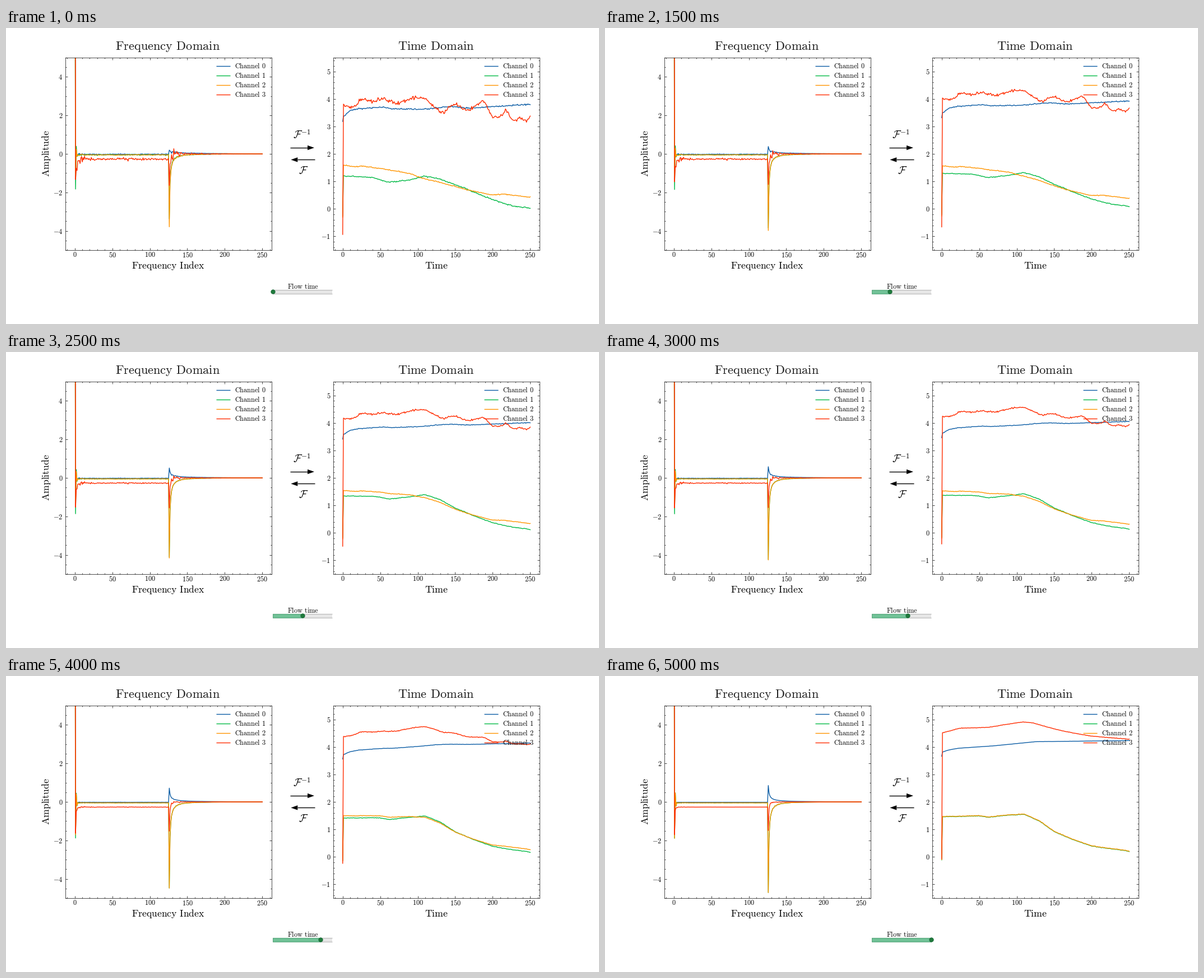
Recreate the animation shown at these times as a matplotlib script. Size 1058x529 px, loop 5.25 s.

```python
import matplotlib.pyplot as plt
import numpy as np
from matplotlib.animation import FuncAnimation
from matplotlib.patches import Polygon, Rectangle
from matplotlib.ticker import AutoMinorLocator

W, H, DPI = 1058, 529, 100
FRAMES, STEP_MS = 21, 250
N = np.arange(251)
COLORS = ["#0C5DA5", "#00B945", "#FF9500", "#FF2C00"]
EASE = [1.05, 0.85, 1.3, 0.95]  # how fast each channel flows
rng = np.random.default_rng(7)

plt.rcParams.update({
    "mathtext.fontset": "cm", "font.size": 8.8, "axes.linewidth": 0.5,
    "xtick.direction": "in", "ytick.direction": "in",
    "xtick.top": True, "ytick.right": True,
})


def series(first, noise, *keys):
    """Rounded path through the keys with jitter; sample 0 stands apart."""
    x, y = zip(*keys)
    path = np.pad(np.interp(N, x, y), 2, mode="edge")
    path = np.convolve(path, np.ones(5) / 5, mode="valid")
    path += rng.normal(0, noise, N.size)
    path[0] = first
    return path


def spectrum(dc, level, spike, ring, peak, power, noise=0.0, burst=0.0):
    """Real half: ringing spike on a level. Imaginary half: power-law decay."""
    n, m = N[1:126], N[126:] - 125
    real = level + (spike - level) * ring ** (n - 1.0)
    real += rng.normal(0, 1, n.size) * (noise + burst * np.exp(-n / 6)) * (n > 2)
    imag = peak * m ** -power * (1 - m / 125)
    imag += (rng.normal(0, 1, m.size) * (m > 2)
             * (noise * np.exp(-m / 40) + burst * np.exp(-m / 9)))
    return np.concatenate([[dc], real, imag])


fall = series(-0.1, 0.006, (0, 1.47), (50, 1.5), (62, 1.45), (85, 1.52),
              (110, 1.56), (130, 1.32), (150, 0.93), (175, 0.64), (200, 0.4),
              (250, 0.22))
time_start = [
    series(3.18, 0.013, (0, 3.33), (10, 3.58), (20, 3.64), (55, 3.70),
           (66, 3.64), (106, 3.62), (145, 3.73), (165, 3.66), (250, 3.81)),
    series(-0.25, 0.011, (0, 1.2), (40, 1.15), (60, 0.97), (90, 1.05),
           (108, 1.2), (130, 1.08), (160, 0.78), (200, 0.33), (225, 0.12),
           (250, 0.02)),
    series(-0.3, 0.009, (0, 1.6), (15, 1.53), (27, 1.56), (55, 1.45), (90, 1.29),
           (105, 1.12), (130, 0.96), (165, 0.7), (200, 0.5), (215, 0.54),
           (250, 0.42)),
    series(-0.93, 0.035, (0, 3.75), (15, 3.72), (24, 4.0), (40, 3.9), (55, 4.03),
           (70, 3.83), (90, 4.0), (108, 4.06), (120, 3.75), (135, 3.48),
           (148, 3.83), (167, 3.58), (187, 3.95), (200, 3.34), (211, 3.34),
           (217, 3.65), (228, 3.13), (236, 3.35), (242, 3.17), (250, 3.35)),
]
time_end = [
    series(3.66, 0.001, (0, 3.8), (8, 3.88), (22, 3.95), (70, 4.04), (125, 4.19),
           (250, 4.23)),
    fall - 0.01,
    fall,
    series(-0.07, 0.004, (0, 4.5), (24, 4.68), (62, 4.71), (98, 4.87),
           (110, 4.91), (122, 4.87), (145, 4.69), (165, 4.56), (200, 4.39),
           (250, 4.28)),
]
freq_start = [
    spectrum(58, -0.02, -0.2, 0.3, 0.2, 0.4, 0.012, 0.04),
    spectrum(13, -0.05, -1.83, -0.25, -3.4, 1.2, 0.015, 0.05),
    spectrum(16, -0.05, -1.2, -0.25, -3.82, 1.25, 0.01, 0.04),
    spectrum(58, -0.27, -1.33, 0.45, -1.65, 1.6, 0.035, 0.22),
]
shared = spectrum(16, -0.05, -1.89, -0.28, -4.75, 1.3, 0.002, 0.03)
freq_end = [
    spectrum(62, -0.02, -0.3, 0.3, 0.86, 0.85),
    shared,
    shared,
    spectrum(66, -0.27, -1.7, 0.12, -1.5, 2.0, 0.001, 0.04),
]

fig = plt.figure(figsize=(W / DPI, H / DPI), dpi=DPI, facecolor="white")


def panel(left, ylim, yticks):
    ax = fig.add_axes([left / W, 1 - 397 / H, 368 / W, 344 / H])
    ax.set(xlim=(-12.5, 262.5), ylim=ylim)
    xticks = range(0, 251, 50)
    ax.set_xticks(xticks, [f"${v}$" for v in xticks])
    ax.set_yticks(yticks, [f"${v}$" for v in yticks])
    ax.xaxis.set_minor_locator(AutoMinorLocator())
    ax.yaxis.set_minor_locator(AutoMinorLocator())
    ax.tick_params(which="major", length=3, width=0.5)
    ax.tick_params(which="minor", length=1.5, width=0.5)
    ax.tick_params(axis="x", pad=1.7)
    return [ax.plot(N, N * 0, color=c, lw=1)[0] for c in COLORS]


freq_lines = panel(106, (-5, 5), range(-4, 5, 2))
time_lines = panel(584, (-1.5, 5.5), range(-1, 6))

# Pixel-space layer for lettering, arrows and the slider
top = fig.add_axes([0, 0, 1, 1], zorder=5)
top.set(xlim=(0, W), ylim=(H, 0))
top.axis("off")


def label(x, y, words, size=8.8, ha="center", **kw):
    words = words.replace(" ", r"\hspace{0.38}")
    return top.text(x, y, rf"$\mathrm{{{words}}}$", size=size, ha=ha,
                    va="baseline", **kw)


def legend(x):
    for i, color in enumerate(COLORS):
        y = 68 + 17 * i
        top.plot([x, x + 25], [y, y], color=color, lw=1, solid_capstyle="butt")
        label(x + 33, y + 3.6, f"Channel {i}", ha="left")


def arrow(tail_x, tip_x, y):
    base = tip_x - 12 * np.sign(tip_x - tail_x)
    top.plot([tail_x, base], [y, y], color="black", lw=1, solid_capstyle="butt")
    top.add_patch(Polygon([(tip_x, y), (base, y - 4.2), (base, y + 4.2)],
                          fc="black", ec="none"))


label(288.8, 39.4, "Frequency Domain", 16.1, color="#1c1c1c")
label(767.6, 39.4, "Time Domain", 16.1, color="#1c1c1c")
label(289, 430.2, "Frequency Index", 12.7)
label(768.3, 430.2, "Time", 12.9)
label(77, 224.3, "Amplitude", 12.8, rotation=90, rotation_mode="anchor")
legend(375)
legend(852.5)

top.text(512.5, 197, r"$\mathcal{F}^{-1}$", size=13.3, va="baseline")
top.text(522.5, 261, r"$\mathcal{F}$", size=13.3, va="baseline")
arrow(507, 550, 214)
arrow(551, 508.3, 235.4)

BAR_X, BAR_W = 476, 106
top.add_patch(Rectangle((BAR_X, 467.5), BAR_W, 7, fc="#e6e6e6", ec="none"))
for y in (467.5, 474.5):
    top.plot([BAR_X, BAR_X + BAR_W], [y, y], color="#b3b3b3", lw=0.72,
             solid_capstyle="butt", zorder=1.1)
fill = top.add_patch(Rectangle((BAR_X, 467.5), 0, 7, fc="#70c196", ec="#5aa67d",
                               lw=0.72, zorder=1.2))
knob, = top.plot([BAR_X], [471], "o", ms=5.3, mfc="#1f7a3c", mec="#1b6a38",
                 mew=0.6, zorder=4)
label(529.5, 465.6, "Flow time", zorder=3)


def draw(k):
    s = k / (FRAMES - 1)
    for i, ease in enumerate(EASE):
        w = s ** ease
        time_lines[i].set_ydata((1 - w) * time_start[i] + w * time_end[i])
        freq_lines[i].set_ydata((1 - w) * freq_start[i] + w * freq_end[i])
    fill.set_width(BAR_W * s)
    fill.set_visible(k > 0)
    knob.set_xdata([BAR_X + 0.3 + BAR_W * s])
    return [*time_lines, *freq_lines, fill, knob]


anim = FuncAnimation(fig, draw, frames=FRAMES, interval=STEP_MS,
                     repeat=True, repeat_delay=0, blit=False)
plt.show()
```
